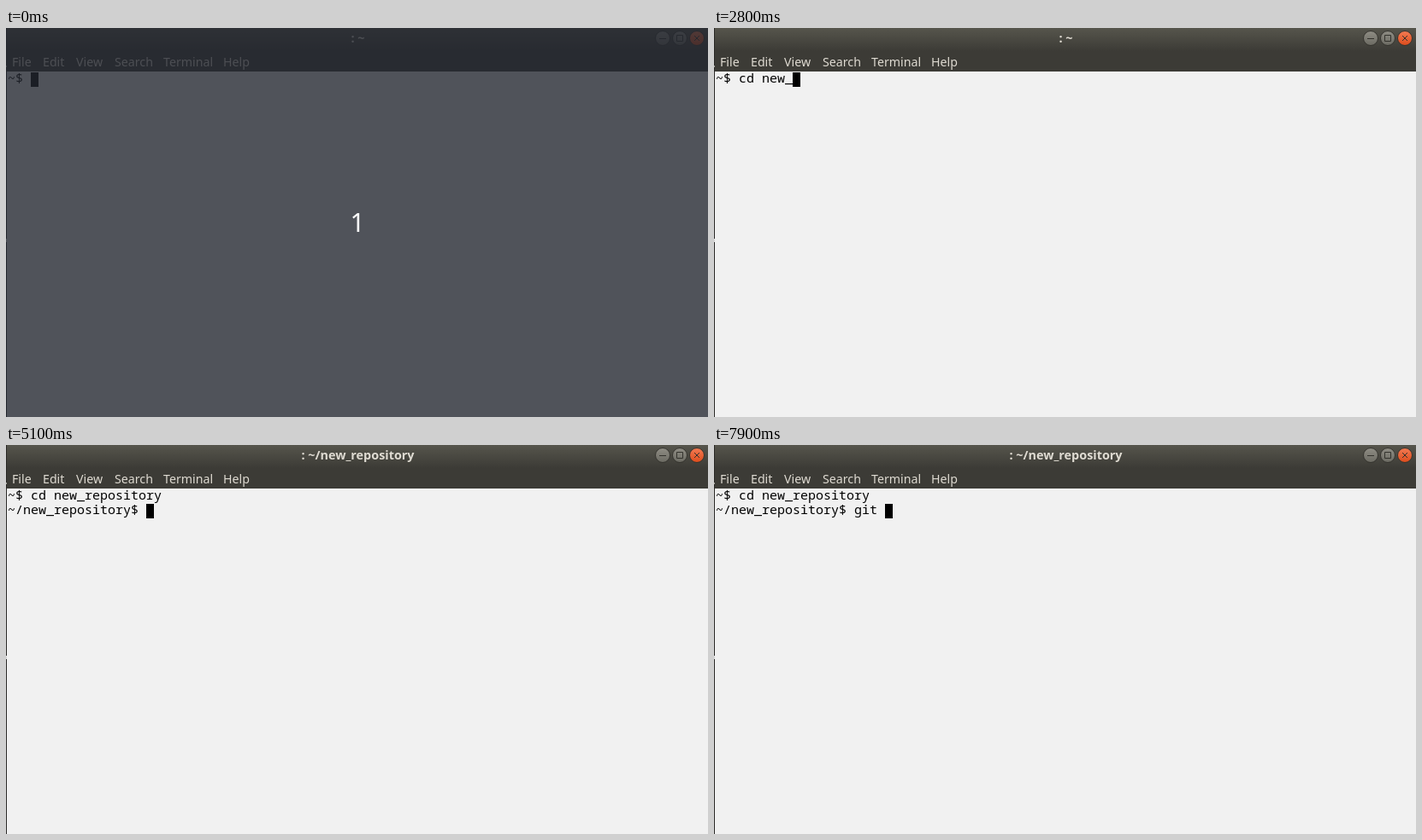
Write an HTML page that moves like this. It is 821x456 px and loops after 8 s.

```html
<!DOCTYPE html>
<html lang="en">
<head>
<meta charset="utf-8">
<title>Terminal</title>
<style>
  html, body { margin: 0; width: 100%; height: 100%; overflow: hidden; background: #f1f1f1; }
  svg { display: block; width: 821px; height: 456px; }
  text { white-space: pre; }
  .ui { font-family: "Noto Sans", "Open Sans", sans-serif; font-size: 14.2px; fill: #dfdbd2; }
  .title { font-size: 14.4px; font-weight: 700; text-anchor: middle; }
  .shell { font-family: "Noto Sans Mono", "DejaVu Sans Mono", monospace; font-size: 15px; fill: #000; }
  .count { font-family: "Noto Sans", "Open Sans", sans-serif; font-size: 30px; fill: #fff; text-anchor: middle; }
  .icon { fill: none; stroke: #33322d; stroke-width: 1; }
</style>
</head>
<body>
<svg viewBox="0 0 821 456">
  <defs>
    <linearGradient id="bar" x2="0" y2="1">
      <stop offset="0" stop-color="#56554c"/>
      <stop offset="1" stop-color="#3c3b36"/>
    </linearGradient>
    <linearGradient id="grey" x2="0" y2="1">
      <stop offset="0" stop-color="#8f8d84"/>
      <stop offset="1" stop-color="#6b6a62"/>
    </linearGradient>
    <linearGradient id="orange" x2="0" y2="1">
      <stop offset="0" stop-color="#f37b53"/>
      <stop offset="1" stop-color="#dd4c1c"/>
    </linearGradient>
  </defs>

  <rect width="821" height="456" fill="#f1f1f1"/>
  <rect width="821" height="51" fill="#3c3b36"/>
  <rect width="821" height="27" fill="url(#bar)"/>
  <rect width="1" height="456" fill="#2b2a27"/>
  <rect y="44" width="1" height="2" fill="#a5a49f"/>
  <rect y="247" width="1" height="4" fill="#d8d8d8"/>

  <text id="title" class="ui title" x="411.5" y="17"></text>
  <g id="menu" class="ui"></g>

  <g stroke="#34332e">
    <circle cx="768" cy="12" r="8.5" fill="url(#grey)"/>
    <circle cx="788" cy="12" r="8.5" fill="url(#grey)"/>
    <circle cx="808" cy="12" r="8.5" fill="url(#orange)"/>
  </g>
  <path class="icon" d="M764 12.5h8M784.5 8.5h7v7h-7zM805 9l6 6m0-6l-6 6"/>

  <text id="line0" class="shell" x="2" y="64"></text>
  <text id="line1" class="shell" x="2" y="81"></text>
  <rect id="cursor" width="9" height="17"/>

  <g id="countdown">
    <rect width="821" height="456" fill="#232730" fill-opacity=".78"/>
    <text class="count" x="411" y="239">1</text>
  </g>
</svg>
<script>
const LOOP = 8000, CELL = 9, ROW = 17, ENTER = 5100, COUNT_END = 300;
const DIR = "new_repository";
const commands = [
  { prompt: "~$ ", start: 0, text: "cd " + DIR,
    keys: [500, 600, 1000, 1100, 1800, 2000, 2800, 3000, 3400, 3500, 3700, 3700, 3900, 4300, 4500, 4600, 5000] },
  { prompt: `~/${DIR}$ `, start: ENTER, text: "git ",
    keys: [7400, 7500, 7700, 7900] }
];
const cursorOff = [[5700, 6200], [6800, 7400]];

const get = id => document.getElementById(id);
const show = (node, on) => node.setAttribute("visibility", on ? "visible" : "hidden");

const menu = { File: 7, Edit: 43, View: 82, Search: 127, Terminal: 184, Help: 254 };
for (const [label, x] of Object.entries(menu)) {
  const item = document.createElementNS("http://www.w3.org/2000/svg", "text");
  item.setAttribute("x", x);
  item.setAttribute("y", 45);
  item.textContent = label;
  get("menu").append(item);
}

function typed({ prompt, start, text, keys }, t) {
  return t < start ? "" : prompt + text.slice(0, keys.filter(k => k <= t).length);
}

function draw(t) {
  const lines = commands.map(command => typed(command, t));
  lines.forEach((line, i) => { get("line" + i).textContent = line; });

  const row = t < ENTER ? 0 : 1;
  get("title").textContent = row ? ": ~/" + DIR : ": ~";
  get("cursor").setAttribute("x", 2 + CELL * lines[row].length);
  get("cursor").setAttribute("y", 52 + ROW * row);
  show(get("cursor"), !cursorOff.some(([from, to]) => t >= from && t < to));
  show(get("countdown"), t < COUNT_END);
}

const begin = performance.now();
function tick() {
  draw((performance.now() - begin) % LOOP);
  requestAnimationFrame(tick);
}
tick();
</script>
</body>
</html>
```
